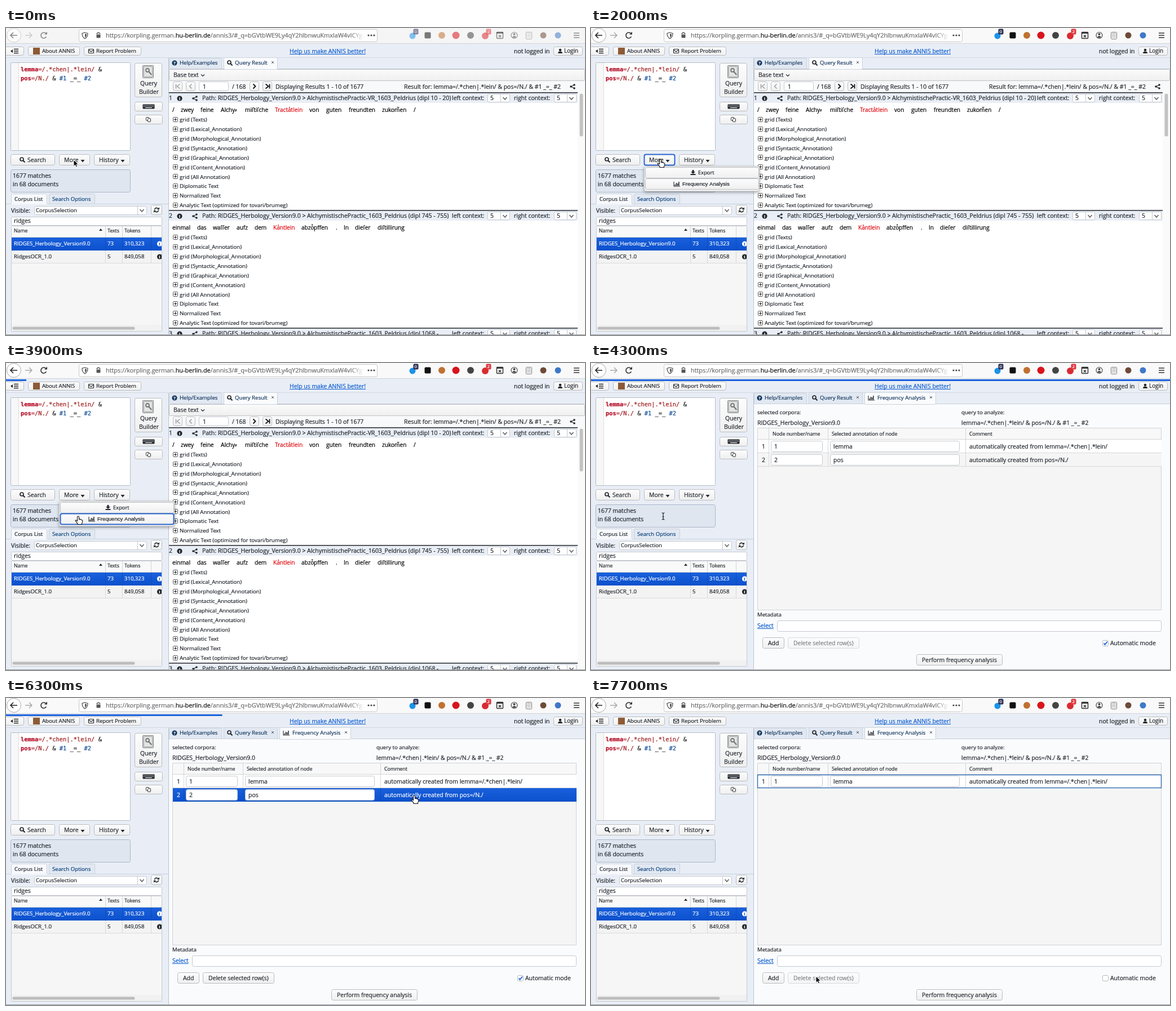
These frames come from a looping animation (1027 by 545 pixels, 8000 ms). An HTML page with a canvas:

```html
<!DOCTYPE html>
<html lang="en">
<head>
<meta charset="utf-8">
<title>Corpus search</title>
<style>
html, body { margin: 0; width: 100%; height: 100%; overflow: hidden; background: #e9eef6; }
canvas { display: block; width: 1027px; height: 545px; }
</style>
</head>
<body>
<canvas id="stage"></canvas>
<script>
const W = 1027, H = 545, LOOP = 8000;
const canvas = document.getElementById('stage');
const ratio = window.devicePixelRatio || 1;
canvas.width = W * ratio;
canvas.height = H * ratio;
const c = canvas.getContext('2d');

const SANS = '"Open Sans", sans-serif', MONO = '"DejaVu Sans Mono", monospace';
const BIG = 10.45, MID = 9.65, SMALL = 8.75;
const INK = '#22272d', PANEL = '#e9eef6', EDGE = '#c3c8cf', BLUE = '#1059d6', LINK = '#0b5cd0', TAB = '#16385f';

// Basic drawing helpers; text is placed by its vertical middle.
function text(s, x, y, size = BIG, color = INK, font = SANS, style = '') {
  c.font = `${style} ${size}px ${font}`;
  c.fillStyle = c.strokeStyle = color;
  c.lineWidth = .22; // slight thickening, like desktop font smoothing
  c.fillText(s, x, y + size * 0.35);
  c.strokeText(s, x, y + size * 0.35);
  return x + c.measureText(s).width;
}
function rect(x, y, w, h, color) {
  c.fillStyle = color;
  c.fillRect(x, y, w, h);
}
function box(x, y, w, h, fill, edge = EDGE, r = 3, line = 1) {
  c.beginPath();
  c.roundRect(x + .5, y + .5, w - 1, h - 1, r);
  if (fill) { c.fillStyle = fill; c.fill(); }
  if (edge) { c.strokeStyle = edge; c.lineWidth = line; c.stroke(); }
}
function disc(x, y, r, color) {
  c.beginPath();
  c.arc(x, y, r, 0, 7);
  c.fillStyle = color;
  c.fill();
}
function ring(x, y, r, color, line = 1.3, from = 0, to = 7) {
  c.beginPath();
  c.arc(x, y, r, from, to);
  c.strokeStyle = color;
  c.lineWidth = line;
  c.stroke();
}
function path(x, y, d, stroke = INK, line = 1.3, fill = null) {
  const p = new Path2D(d);
  c.save();
  c.translate(x, y);
  if (fill) { c.fillStyle = fill; c.fill(p); }
  if (stroke) { c.strokeStyle = stroke; c.lineWidth = line; c.stroke(p); }
  c.restore();
}
function shade(y, h, top, bottom) {
  const g = c.createLinearGradient(0, y, 0, y + h);
  g.addColorStop(0, top);
  g.addColorStop(1, bottom);
  return g;
}
function button(x, y, w, h, focus) {
  box(x, y, w, h, shade(y, h, '#fdfdfd', '#efefef'), '#b9bcc0', 3);
  if (focus) box(x, y, w, h, null, '#2a67d0', 3, 2);
}

// Icons, each centred on x, y.
const caret = (x, y, color = INK) => path(x, y, 'M-3.5-2h7L0 2.5z', null, 0, color);
const chevron = (x, y, color = '#666') => path(x, y, 'M-3.5-2L0 2L3.5-2', color, 1.7);
const search = (x, y) => { ring(x - 1, y - 1, 3, INK, 1.7); path(x, y, 'M1 1L4.5 4.5', INK, 2); };
const close = (x, y) => path(x, y, 'M-2-2L2 2M2-2L-2 2', '#4c5660', 1);
function bullet(x, y, mark, color = INK, markColor = '#fff') {
  disc(x, y, 4.6, color);
  c.textAlign = 'center';
  text(mark, x, y, 7.5, markColor, SANS, 'bold');
  c.textAlign = 'left';
}
function share(x, y) {
  path(x, y, 'M3-3L-3 0L3 3', INK, 1.2);
  disc(x + 3, y - 3, 1.8, INK);
  disc(x - 3, y, 1.8, INK);
  disc(x + 3, y + 3, 1.8, INK);
}
function bars(x, y) {
  path(x, y, 'M-5-4V4H6', INK, 1.1);
  [2, 5, 4, 7].forEach((h, i) => rect(x - 3.5 + i * 2.2, y + 3 - h, 1.5, h, INK));
}
function reload(x, y) {
  ring(x, y, 5, '#333', 1.7, .5, 5.4);
  path(x + 4, y - 2.5, 'M-3 1H2V-4z', null, 0, '#333');
}
function refresh(x, y) {
  ring(x, y, 3.6, INK, 1.6, 3.3, 5.9);
  ring(x, y, 3.6, INK, 1.6, .15, 2.75);
  path(x, y, 'M1-.8H5V-4.8zM-1 .8H-5V4.8z', null, 0, INK);
}

function address() {
  box(129, 2, 530, 23, '#fff', '#c6c6ca', 3);
  path(140, 13, 'M0-5L5-3.5Q5 3 0 6Q-5 3-5-3.5z', '#555', 1.3);
  path(140, 13, 'M0-3L3-2Q3 2 0 4z', null, 0, '#555');
  box(160, 11, 8, 7, '#555', null, 1);
  ring(164, 11, 2.8, '#555', 1.4, 3.14, 6.29);
  c.save();
  c.beginPath();
  c.rect(170, 2, 465, 23);
  c.clip();
  let x = text('https://korpling.german.', 177, 13, 10.9, '#6b6b6e');
  x = text('hu-berlin.de', x, 13, 10.9, '#0c0c0d');
  text('/annis3/#_q=bGVtbWE9Ly4qY2hlbnwuKmxlaW4vICYgcG9z', x, 13, 10.9, '#6b6b6e');
  const fade = c.createLinearGradient(610, 0, 635, 0);
  fade.addColorStop(0, 'rgba(255,255,255,0)');
  fade.addColorStop(1, '#fff');
  rect(610, 4, 26, 19, fade);
  c.restore();
  for (const dot of [643, 648, 653]) disc(dot, 13, 1.6, '#444');
}

function toolbar(active) {
  rect(0, 0, W, 27, active ? '#f9f9fa' : '#f5f5f6');
  rect(0, 27, W, 1, '#d0d3d8');
  address();
  c.globalAlpha = active ? 1 : .55;
  box(1, 0, 26, 26, '#fff', '#aaa', 13);
  path(14, 13, 'M6 0H-5M-1-5L-6 0L-1 5', '#222', 1.6);
  path(40, 13, 'M-6 0H5M1-5L6 0L1 5', '#aaa', 1.5);
  reload(67, 13);

  disc(721, 14, 5.5, '#1b93e8');
  box(742, 7, 12, 12, '#111', null, 2);
  disc(773, 13, 6, '#bf7130');
  disc(798, 13, 6.5, '#d8141c');
  disc(824, 13, 6, '#444');
  disc(850, 14, 6, '#d92b31');
  for (const [bx, n, color] of [[727, '0', '#2d2f55'], [856, '2', '#e0383f']]) {
    box(bx - 5, 1, 10, 11, color, null, 2);
    text(n, bx - 2.5, 6.5, 8, '#fff');
  }
  box(870, 7, 12, 12, null, '#333', 1, 1.5);
  rect(870, 7, 12, 3, '#333');
  path(876, 14.5, 'M-2-2L2 2M2-2L-2 2', '#333', 1.4);
  ring(901.5, 13, 5.5, '#444', 1.2);
  disc(901.5, 11, 2, '#444');
  path(901.5, 13, 'M-3.5 3Q0-1 3.5 3Q0 6-3.5 3', null, 0, '#444');
  box(922, 7, 11, 13, '#fff', '#777', 1);
  path(927, 13, 'M-3-3H4M-3 0H4M-3 3H4', '#888', 1);
  disc(953, 13, 5.5, '#6e4a38');
  disc(979, 13, 5.5, '#3f78c8');
  path(1012, 13, 'M-5-4H5M-5 0H5M-5 4H5', '#333', 1.5);
  c.globalAlpha = 1;
}

function header() {
  button(-3, 33, 35, 16);
  path(15, 41, 'M-1-3.5H7M-1 0H7M-1 3.5H7', '#222', 1.7);
  path(10, 41, 'M2-3L-2 0L2 3z', null, 0, '#222');
  button(39, 33, 92, 16);
  rect(48, 35, 12, 12, '#8c5a35');
  text('About ANNIS', 64, 41, MID);
  button(138, 33, 102, 16);
  box(146, 37, 10, 8, null, INK, 1, 1.2);
  path(151, 41, 'M-4-2L0 1L4-2', INK, 1.1);
  text('Report Problem', 160, 41, MID);
  const end = text('Help us make ANNIS better!', 503, 41, BIG, LINK);
  rect(503, 46, end - 503, 1, LINK);
  text('not logged in', 901, 41);
  button(971, 33, 52, 16);
  disc(983, 39, 2.3, INK);
  path(983, 44, 'M-4 1Q-4-2.5 0-2.5Q4-2.5 4 1z', null, 0, INK);
  text('Login', 990, 41, 9.9);
}

function queryPane(focusMore) {
  box(8, 61, 213, 157, '#fff', '#b3bdca', 1);
  rect(9, 62, 13, 155, '#f7f7f7');
  rect(22, 62, 1, 155, '#ddd');
  const code = (x, y, parts) => parts.forEach(([s, color, style]) => { x = text(s, x, y, 10.4, color, MONO, style); });
  code(26, 73, [['lemma', '#b5122b', 'bold'], ['=', '#b5122b'], ['/.*chen|.*lein/', '#a11d1d'], [' &', '#222']]);
  code(26, 89, [['pos', '#b5122b', 'bold'], ['=', '#b5122b'], ['/N./', '#a11d1d'], [' & ', '#222'],
    ['#1', '#16509a'], [' _=_ ', '#222'], ['#2', '#16509a']]);

  button(228, 62, 49, 61);
  box(242, 66, 20, 23, '#c9cbcd', '#888', 1);
  box(244, 68, 16, 19, '#e3e4e5', '#aaa', 1);
  ring(251, 75, 3, '#777', 1.8);
  path(253, 77, 'M0 0L5 6', '#777', 2.2);
  text('Query', 238, 98);
  text('Builder', 236, 113);
  button(228, 131, 50, 17);
  box(242, 135, 22, 9, INK, null, 1);
  for (let i = 0; i < 18; i++) rect(244 + (i % 9) * 2.1, 137 + Math.floor(i / 9) * 2, 1, 1, '#fff');
  rect(247, 141, 12, 1, '#fff');
  button(228, 154, 50, 17);
  box(248, 158, 6, 7, '#fff', INK, 1);
  box(251, 160, 6, 7, '#fff', INK, 1);

  button(8, 224, 79, 20);
  search(29, 234);
  text('Search', 38, 234);
  button(94, 224, 55, 20, focusMore);
  text('More', 103, 234);
  caret(136, 236);
  button(156, 224, 64, 20);
  text('History', 165, 234);
  caret(207, 236);
  box(8, 251, 213, 41, '#dfe6f0', '#aab6c8', 3);
  text('1677 matches', 12, 262);
  text('in 68 documents', 12, 277);
}

function corpusPane() {
  rect(0, 312, 288, 1, '#c8d0da');
  box(9, 294, 64, 20, '#f7f9fc', '#c8d0da', 2);
  rect(9, 312, 64, 2, '#f0f3f8');
  box(76, 294, 82, 19, '#e1e8f2', '#c8d0da', 2);
  text('Corpus List', 15, 304, MID);
  text('Search Options', 82, 304, MID, '#0b3f78');
  text('Visible:', 9, 324);
  box(50, 316, 200, 16, '#fff');
  rect(233, 317, 1, 14, EDGE);
  text('CorpusSelection', 53, 324, MID);
  chevron(241, 324);
  button(257, 314, 20, 18);
  refresh(267, 323);
  box(9, 335, 268, 16, '#fff', EDGE, 2);
  text('ridges', 14, 342.5);

  rect(9, 351, 268, 188, '#f6f6f6');
  rect(9, 351, 268, 21, '#f9f9f9');
  rect(9, 372, 268, 23, shade(372, 23, '#1a60dc', '#0b50cc'));
  rect(9, 395, 268, 22, '#f3f3f3');
  rect(9, 371, 268, 1, '#d4d4d4');
  rect(9, 417, 268, 1, '#ddd');
  for (const x of [176, 206, 257]) {
    rect(x, 351, 1, 21, '#d4d4d4');
    rect(x, 372, 1, 23, '#0d4cbc');
    rect(x, 395, 1, 22, '#d8d8d8');
  }
  text('Name', 14, 360, SMALL);
  text('Texts', 180, 360, SMALL);
  text('Tokens', 210, 360, SMALL);
  path(168, 358, 'M-3 2H3L0-2z', null, 0, INK);
  c.save();
  c.beginPath();
  c.rect(9, 351, 268, 188);
  c.clip();
  [['RIDGES_Herbology_Version9.0', '73', '310,323', 383, '#fff', BLUE],
   ['RidgesOCR_1.0', '5', '849,058', 406, INK, '#fff']].forEach(([name, n, tokens, y, color, mark]) => {
    text(name, 14, y, MID, color);
    text(n, 180, y, MID, color);
    text(tokens, 210, y, MID, color);
    bullet(272.5, y, 'i', color, mark);
  });
  c.restore();
  rect(9, 527, 268, 12, '#f1f1f1');
  box(11, 530, 218, 6, '#bcbcbc', null, 3);
  box(9, 351, 268, 188, null, '#c5c9cf', 1);
}

function tabs(withFrequency) {
  rect(288, 52, 1, H, '#b9c3d0');
  rect(289, 52, W, 21, PANEL);
  rect(0, 52, W, 1, '#d2d9e2');
  rect(289, 72, W, 1, '#c8d0da');
  box(289, 53, 94, 20, '#e1e8f2', '#cbd3dd', 2);
  bullet(299, 62, '?', TAB);
  text('Help/Examples', 308, 62, MID, TAB);
  const tab = (x, w, on) => box(x, 52, w, on ? 22 : 21, on ? '#fafbfd' : '#e1e8f2', '#cbd3dd', 2);
  tab(386, 96, !withFrequency);
  search(397, 62);
  text('Query Result', 406, 62, MID, TAB);
  close(473, 61);
  if (!withFrequency) return;
  tab(485, 127, true);
  bars(497, 62);
  text('Frequency Analysis', 508, 62, MID, TAB);
  close(603, 61);
}

const GRIDS = ['Texts', 'Lexical_Annotation', 'Morphological_Annotation', 'Syntactic_Annotation',
  'Graphical_Annotation', 'Content_Annotation', 'All Annotation'];
const TREE = [...GRIDS.map(g => `grid (${g})`), 'Diplomatic Text', 'Normalized Text',
  'Analytic Text (optimized for tovari/brumeg)'];
const RESULTS = [
  ['-VR_1603_Peldrius (dipl 10 - 20)', [['/', 295], ['zwey', 310], ['feine', 345], ['Alchy⸗', 381], ['miſtiſche', 424],
    ['Tractåtlein', 477, 1], ['von', 538], ['guten', 568], ['freundten', 608], ['zukom̃en', 667], ['/', 723]]],
  ['_1603_Peldrius (dipl 745 - 755)', [['einmal', 295], ['das', 339], ['waſſer', 367], ['aufz', 409], ['dem', 441],
    ['Kåntlein', 474, 1], ['abzo̊pffen', 524], ['.', 585], ['In', 599], ['dieſer', 619], ['diſtillirung', 659]]],
  ['_1603_Peldrius (dipl 1068 -', []]
];

function context(label, x, boxX, y) {
  text(label, x, y + 9);
  box(boxX, y + 2, 40, 15, '#fff', EDGE, 2);
  rect(boxX + 23, y + 3, 1, 13, EDGE);
  text('5', boxX + 5, y + 9.5);
  chevron(boxX + 31, y + 10);
}

function resultView() {
  rect(289, 73, W, H, '#fff');
  rect(289, 73, W, 42, '#f8f9fa');
  box(289, 73, 738, 21, shade(73, 21, '#fbfbfb', '#efefef'), '#bfc2c6', 2);
  text('Base text', 297, 83);
  path(349, 84, 'M-3-1.5L0 1.5L3-1.5', INK, 1.2);
  [[296, 'M-3-4V4M4-4L-1 0L4 4', 0], [319, 'M2-4L-2 0L2 4', 0], [432, 'M-2-4L2 0L-2 4', 1],
   [455, 'M4-4V4M-3-4L2 0L-3 4', 1]].forEach(([x, d, on]) => {
    button(x, 95, 17, 17);
    path(x + 8.5, 103.5, d, on ? '#111' : '#999', on ? 1.8 : 1.4);
  });
  box(342, 95, 53, 17, '#fff');
  text('1', 349, 104);
  text('/ 168', 401, 104);
  text('Displaying Results 1 - 10 of 1677', 478, 104);
  text('Result for: lemma=/.*chen|.*lein/ & pos=/N./ & #1 _=_ #2', 706, 104);
  share(1005, 104);

  RESULTS.forEach(([title, words], i) => {
    const y = 115 + i * 209;
    rect(289, y, 725, 18, PANEL);
    rect(289, y - 1, 725, 1.6, '#30343a');
    text(String(i + 1), 289, y + 9);
    bullet(308, y + 10, 'i');
    share(335, y + 10);
    text(`Path: RIDGES_Herbology_Version9.0 > AlchymistischePractic${title}`, 348, y + 9);
    context('left context:', 791, 854, y);
    context('right context:', 901, 972, y);
    words.forEach(([word, x, hit]) => text(word, x, y + 30.5, 10.1, hit ? '#e0050d' : '#000'));
    TREE.forEach((label, k) => {
      const ty = y + 48 + k * 16.87;
      if (!words.length) return;
      box(296, Math.round(ty) - 5, 9, 9, '#fff', '#555', 1);
      path(300.5, Math.round(ty) - .5, 'M-2.5 0H2.5M0-2.5V2.5', '#222', 1);
      text(label, 308, ty, MID);
    });
  });
  rect(1014, 115, 13, H, '#fafafa');
  box(1017, 116, 7, 77, '#c2c2c2', null, 3.5);
}

function frequencyView(selected, deleted, canDelete) {
  rect(289, 73, W, H, '#fafbfd');
  text('selected corpora:', 295, 88, MID);
  text('RIDGES_Herbology_Version9.0', 295, 106);
  text('query to analyze:', 657, 88, MID);
  text('lemma=/.*chen|.*lein/ & pos=/N./ & #1 _=_ #2', 657, 106);
  box(295, 115, 717, 324, '#f5f5f5', '#cfd2d6', 0);
  rect(296, 116, 715, 20, '#f8f8f8');
  rect(296, 135, 715, 1, '#d4d4d4');
  const COLUMNS = [315, 420, 664];
  COLUMNS.forEach(x => rect(x, 116, 1, 20, '#d4d4d4'));
  text('Node number/name', 322, 126, 8.85);
  text('Selected annotation of node', 427, 126, 8.85);
  text('Comment', 671, 126, 8.85);
  const rows = [['1', 'lemma', 'lemma=/.*chen|.*lein/'], ['2', 'pos', 'pos=/N./']];
  rows.slice(0, deleted ? 1 : 2).forEach(([n, name, query], i) => {
    const y = 136 + i * 24, hot = selected && i === 1, color = hot ? '#fff' : INK;
    rect(296, y, 716, 24, hot ? shade(y, 24, '#1a60dc', '#0b50cc') : i ? '#f5f5f5' : '#fff');
    rect(296, y + 23, 716, 1, hot ? '#0d4cbc' : '#d8d8d8');
    COLUMNS.forEach(x => rect(x, y, 1, 24, hot ? '#0d4cbc' : '#d8d8d8'));
    text(n, 303, y + 12, BIG, color);
    box(319, y + 2, 92, 20, '#fff');
    box(424, y + 2, 230, 20, '#fff');
    text(n, 325, y + 12);
    text(name, 430, y + 12);
    text('automatically created from ' + query, 671, y + 12, BIG, color);
  });
  if (deleted) box(295, 136, 717, 24, null, '#3a72b8', 0, 1.5);

  text('Metadata', 295, 447, MID);
  const end = text('Select', 295, 466, BIG, LINK);
  rect(295, 471, end - 295, 1, LINK);
  box(330, 457, 682, 20, '#fff');
  button(304, 487, 39, 20);
  text('Add', 314, 497);
  c.globalAlpha = canDelete ? 1 : .5;
  button(349, 487, 127, 20);
  text('Delete selected row(s)', 359, 497);
  c.globalAlpha = 1;
  box(907, 492, 11, 11, '#fff', '#b5b8bc', 2);
  if (!deleted) path(912.5, 497.5, 'M-3 0L-1 2.5L3.5-3', '#1c64d8', 1.9);
  text('Automatic mode', 921, 497);
  button(577, 517, 153, 20);
  text('Perform frequency analysis', 587, 527);
}

function menu(focusFrequency) {
  c.save();
  c.shadowColor = 'rgba(0,0,0,.3)';
  c.shadowBlur = 5;
  c.shadowOffsetY = 2;
  box(94, 245, 205, 45, '#fafafa', '#ccc', 3);
  c.restore();
  button(96, 247, 202, 20);
  path(181, 256, 'M-1.5-4H1.5V-1H4L0 3L-4-1H-1.5z', null, 0, INK);
  rect(176.5, 259, 9, 2, INK);
  text('Export', 190, 257, 9.4);
  button(96, 267, 202, 20, focusFrequency);
  bars(152, 277);
  text('Frequency Analysis', 162, 277, 9.6, INK, '"Liberation Sans", Arial, sans-serif');
}

const POINTERS = {
  arrow: (x, y) => path(x, y, 'M0 0V11.5L2.7 9L4.5 13L6.5 12L4.8 8.2H8.4z', '#fff', 1, '#000'),
  hand: (x, y) => path(x, y, 'M-1.5 1Q0-1 1.5 1V5.5Q3 4.5 4 6Q5.5 5.3 6 6.8Q8 6.5 7.8 8.5Q7.8 11 6.5 12.5V14.5H-1V13Q-3 11-5 7.8Q-4.5 6-1.5 8.5z', '#111', 1.1, '#fff'),
  beam: (x, y) => path(x, y, 'M-2.5-6Q0-6 0-4.5Q0-6 2.5-6M0-4.5V4.5M-2.5 6Q0 6 0 4.5Q0 6 2.5 6M-1.5 1H1.5', '#111', 1.1)
};
// [time, x, y] stops, with eased travel in between.
const STOPS = [[0, 120, 234], [800, 120, 234], [1100, 123, 233], [2300, 123, 233], [3100, 128, 272], [4400, 128, 272],
  [5200, 723, 178], [5300, 723, 178], [5600, 724, 173], [6300, 724, 173], [7150, 399, 494], [LOOP, 399, 494]];
const SHAPES = [[0, 'arrow'], [150, 'hand'], [4200, 'beam'], [4500, 'arrow'], [5100, 'hand'], [6400, 'arrow'],
  [7100, 'hand'], [7500, 'arrow']];

function pointer(t) {
  const i = STOPS.findIndex(s => s[0] > t);
  const [t0, x0, y0] = STOPS[i - 1], [t1, x1, y1] = STOPS[i];
  const u = (t - t0) / (t1 - t0), e = u * u * (3 - 2 * u);
  const shape = SHAPES.filter(s => s[0] <= t).pop()[1];
  POINTERS[shape](x0 + (x1 - x0) * e, y0 + (y1 - y0) * e);
}

function loadingWidth(t) {
  if (t >= 3500 && t < 4200) return (t - 3500) * .09;
  if (t >= 4200 && t < 4500) return W;
  if (t >= 6300 && t < 6600) return Math.min(W, 377 + (t - 6300) * 6.5);
  return 0;
}

function draw(t) {
  c.setTransform(ratio, 0, 0, ratio, 0, 0);
  rect(0, 0, W, H, PANEL);
  const analysing = t >= 4200, deleted = t >= 7500;
  toolbar(t >= 150);
  header();
  queryPane(t >= 1600 && t < 3200);
  corpusPane();
  if (analysing) frequencyView(t >= 5700, deleted, t >= 6300 && !deleted);
  else resultView();
  tabs(analysing);
  if (t >= 2000 && !analysing) menu(t >= 3200);
  rect(0, 29, loadingWidth(t), 3, '#1a62dc');
  rect(0, 544, W, 1, '#9299a2');
  pointer(t);
}

const start = performance.now();
function tick() {
  draw((performance.now() - start) % LOOP);
  requestAnimationFrame(tick);
}
tick();
</script>
</body>
</html>
```
